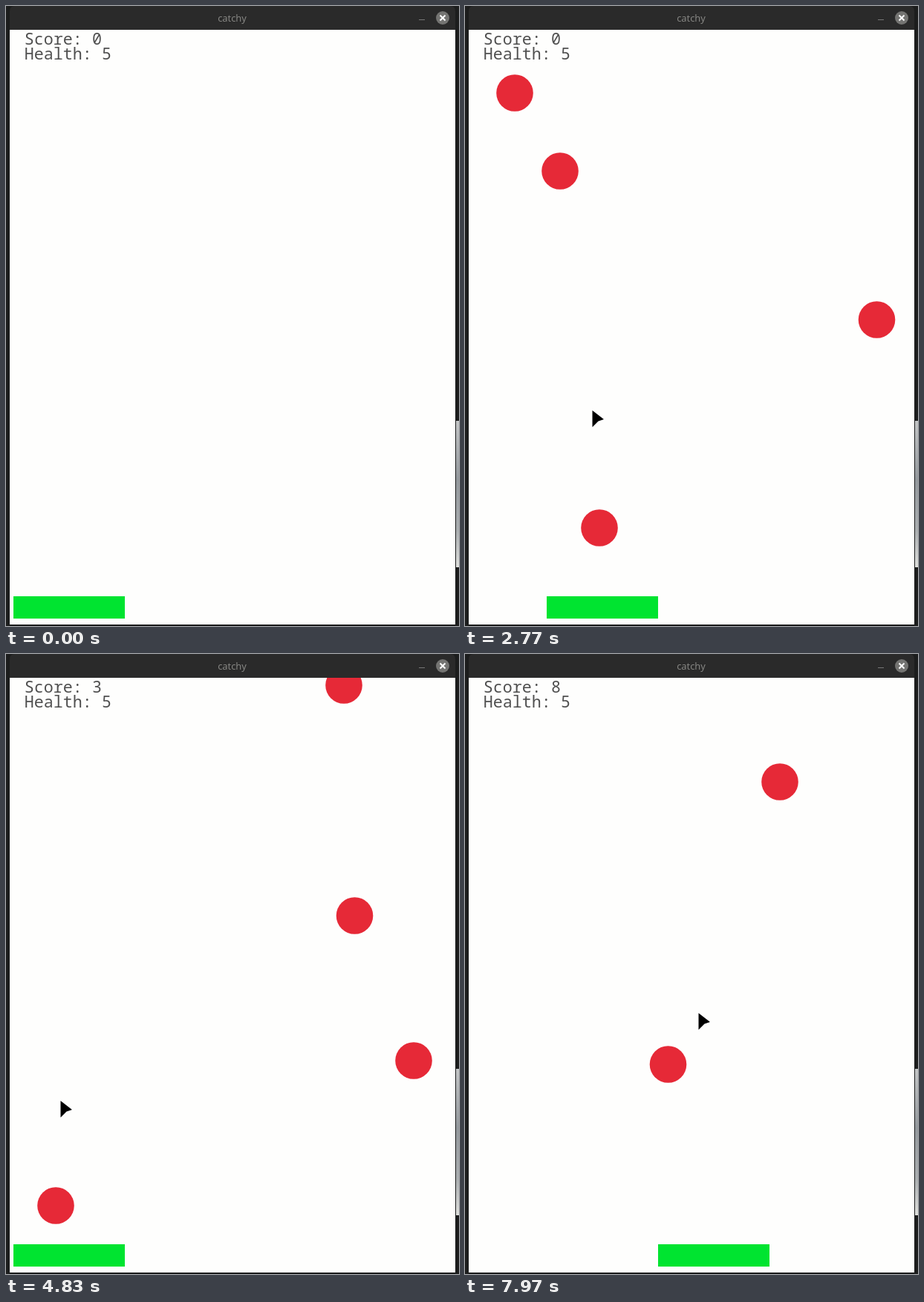
Recreate the animation shown at these times as an HTML page. Size 610 by 834 pixels, loop 8 s.

```html
<!DOCTYPE html>
<html lang="en">
<head>
<meta charset="utf-8">
<title>catchy</title>
<style>
  html, body { margin: 0; width: 100%; height: 100%; overflow: hidden; background: #1c1d1d; }
  svg { display: block; width: 610px; height: 834px; }
  .title { font: 13px "Open Sans", sans-serif; fill: #8b8b88; text-anchor: middle; }
  .hud { font: 300 21.7px "Noto Sans Mono", monospace; fill: #505050; white-space: pre; }
</style>
</head>
<body>
<svg viewBox="0 0 610 834">
  <defs>
    <linearGradient id="photo" x2="0" y2="1">
      <stop offset="0" stop-color="#c3c5c6"/>
      <stop offset=".4" stop-color="#93989c"/>
      <stop offset=".75" stop-color="#aaaeb0"/>
      <stop offset="1" stop-color="#dedfdc"/>
    </linearGradient>
    <clipPath id="field"><rect x="5" y="32" width="600" height="800"/></clipPath>
  </defs>

  <rect width="610" height="834" fill="#1c1d1d"/>
  <rect x="606" y="558" width="4" height="197" fill="url(#photo)"/>
  <path d="M5 32V7q0-7 7-7H598q7 0 7 7V32z" fill="#2a2a2a"/>
  <text class="title" x="304.5" y="21">catchy</text>
  <path d="M556 18.5h8" stroke="#777"/>
  <circle cx="588" cy="16" r="9" fill="#747472"/>
  <path d="M584.5 12.5l7 7m0-7l-7 7" stroke="#fff" stroke-width="2"/>

  <g clip-path="url(#field)">
    <rect x="5" y="32" width="600" height="800" fill="#fefefd"/>
    <text class="hud" x="24.8" y="52" id="score">Score: 0</text>
    <text class="hud" x="24.8" y="72">Health: 5</text>
    <g id="balls" fill="#e62937"></g>
    <rect id="paddle" y="794" width="150" height="30" fill="#00e430"/>
    <path id="cursor" d="M-.5-1L15 11L7.5 13.5L-.5 21.5z" fill="#000"
      stroke="#fff" stroke-width="2" paint-order="stroke"/>
  </g>
</svg>
<script>
const LOOP = 8000, STEP = 1000 / 30, STEPS = 240;
const TOP = 32, FALL = 5, CATCH_Y = 770, PADDLE_SPEED = 20;
const $ = id => document.getElementById(id);

// Each ball: x, and the game tick at which its centre enters the field.
const balls = [
  [181, 32], [554.5, 88], [128, 128], [67, 149], [549, 188],
  [469.5, 227], [455, 289], [311, 320], [273.5, 375], [424, 451]
].map(([x, born]) => {
  const el = document.createElementNS("http://www.w3.org/2000/svg", "circle");
  el.setAttribute("cx", x);
  el.setAttribute("r", 24.8);
  $("balls").append(el);
  return { el, born };
});

// Places where the hand rests: step of arrival, step of leaving, x, y.
const stops = [
  [14, 14, 110, 545], [34, 34, 250, 510], [83, 92, 172, 545], [108, 119, 520, 556],
  [126, 146, 74, 602], [164, 164, 490, 500], [199, 224, 437, 452], [260, 260, 252, 500]
];
const easeOut = p => 1 - (1 - p) ** 2;

function cursorAt(n) {
  const i = stops.findIndex(s => n <= s[1]);
  const [arrive, , x, y] = stops[i];
  if (i === 0 || n >= arrive) return [x, y];
  const [, leave, x0, y0] = stops[i - 1];
  const p = easeOut((n - leave) / (arrive - leave));
  return [x0 + (x - x0) * p, y0 + (y - y0) * p];
}

// The paddle chases the cursor at a limited speed, on a 10 px grid.
const paddleX = [10];
for (let n = 1; n < STEPS; n++) {
  const x = paddleX[n - 1];
  const goal = n > stops[0][0] ? 10 * Math.ceil((cursorAt(n - 1)[0] - 70) / 10) : x;
  paddleX.push(x + Math.max(-PADDLE_SPEED, Math.min(PADDLE_SPEED, goal - x)));
}

function draw(time) {
  const n = Math.min(STEPS - 1, Math.floor((time % LOOP + 5) / STEP));
  const tick = Math.floor(n * (2 + 1 / 120)); // game runs slightly above 60 Hz
  let score = 0;
  for (const { el, born } of balls) {
    const y = TOP + FALL * (tick - born), caught = y >= CATCH_Y;
    if (caught) score++;
    el.setAttribute("cy", y);
    el.setAttribute("visibility", caught ? "hidden" : "visible");
  }
  $("score").textContent = "Score: " + score;
  $("paddle").setAttribute("x", paddleX[n]);
  const [x, y] = cursorAt(n).map(Math.round);
  $("cursor").setAttribute("transform", `translate(${x} ${y})`);
  $("cursor").setAttribute("visibility", n < stops[0][0] ? "hidden" : "visible");
}

const start = performance.now();
function loop() {
  draw(performance.now() - start);
  requestAnimationFrame(loop);
}
loop();
</script>
</body>
</html>
```
